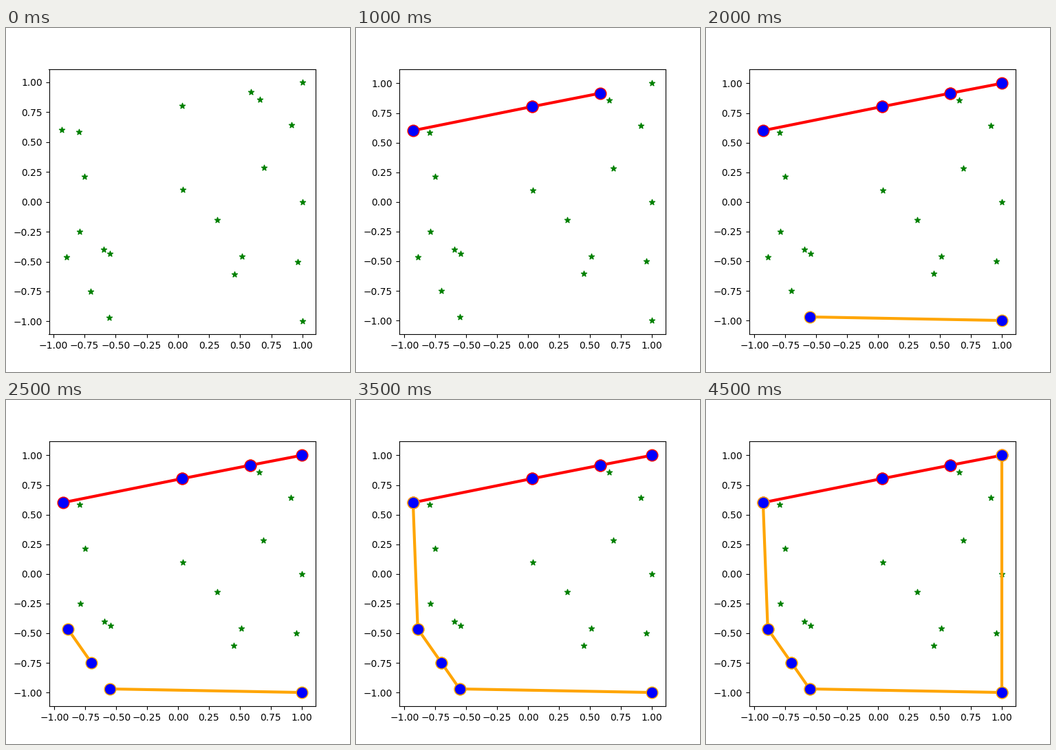
These frames come from a looping animation (500x500 px, 5000 ms). A matplotlib script:

```python
import matplotlib.pyplot as plt
import numpy as np
from matplotlib.animation import FuncAnimation

STEPS, STEP_MS = 10, 500
RADIUS = 3.0            # star extent used for the axis padding, in pixels
AX_W, AX_H = 387.5, 385.0

# hull corners
TOP_RIGHT, LOW_RIGHT = (1, 1), (1, -1)
TOP_A, TOP_B = (0.034, 0.804), (0.586, 0.917)
LEFT, LOW_LEFT = (-0.93, 0.602), (-0.892, -0.464)
BEND, BOTTOM = (-0.70, -0.75), (-0.553, -0.97)

INNER = [
    (-0.795, 0.585), (-0.75, 0.212), (-0.79, -0.25), (-0.595, -0.40),
    (-0.545, -0.435), (0.039, 0.10), (0.317, -0.153), (0.657, 0.856),
    (0.69, 0.284), (0.912, 0.643), (0.513, -0.459), (0.452, -0.606),
    (0.96, -0.50), (1, 0),
]
HULL = [TOP_RIGHT, LOW_RIGHT, TOP_A, TOP_B, LEFT, LOW_LEFT, BEND, BOTTOM]
POINTS = np.array(INNER + HULL)

# (step of appearance, start, end, colour)
EDGES = [
    (1, TOP_A, TOP_B, "red"),
    (2, LEFT, TOP_A, "red"),
    (3, TOP_B, TOP_RIGHT, "red"),
    (4, BOTTOM, LOW_RIGHT, "orange"),
    (5, LOW_LEFT, BEND, "orange"),
    (6, LEFT, LOW_LEFT, "orange"),
    (7, BEND, BOTTOM, "orange"),
    (9, LOW_RIGHT, TOP_RIGHT, "orange"),
]


def padded(lo, hi, pad_lo, pad_hi):
    lo, hi = lo - pad_lo, hi + pad_hi
    margin = 0.05 * (hi - lo)
    return lo - margin, hi + margin


def limits(span_x, span_y):
    """Axis limits that leave room for the stars at the given view spans."""
    ux, uy = RADIUS * span_x / AX_W, RADIUS * span_y / AX_H
    (x0, y0), (x1, y1) = POINTS.min(axis=0), POINTS.max(axis=0)
    side = 0.951 * ux
    return padded(x0, x1, side, side), padded(y0, y1, 0.809 * uy, uy)


START_VIEW = limits(1, 1)
HULL_VIEW = limits(*(hi - lo for lo, hi in START_VIEW))

fig, ax = plt.subplots(figsize=(5, 5), dpi=100)
fig.subplots_adjust(left=0.125, right=0.9, bottom=0.11, top=0.88)
ax.scatter(POINTS[:, 0], POINTS[:, 1], marker="*", color="green")

lines = []
for step, a, b, color in EDGES:
    line, = ax.plot([a[0], b[0]], [a[1], b[1]], color=color, linewidth=3,
                    marker="o", markersize=12, markerfacecolor="blue")
    lines.append((step, line))

ticks = np.arange(-1, 1.01, 0.25)
ax.set_xticks(ticks)
ax.set_yticks(ticks)


def update(i):
    xlim, ylim = HULL_VIEW if i else START_VIEW
    ax.set_xlim(*xlim)
    ax.set_ylim(*ylim)
    for step, line in lines:
        line.set_visible(i >= step)
    return [line for _, line in lines]


anim = FuncAnimation(fig, update, frames=STEPS, interval=STEP_MS,
                     init_func=lambda: update(0), repeat=True,
                     repeat_delay=0, blit=False)
plt.show()
```
